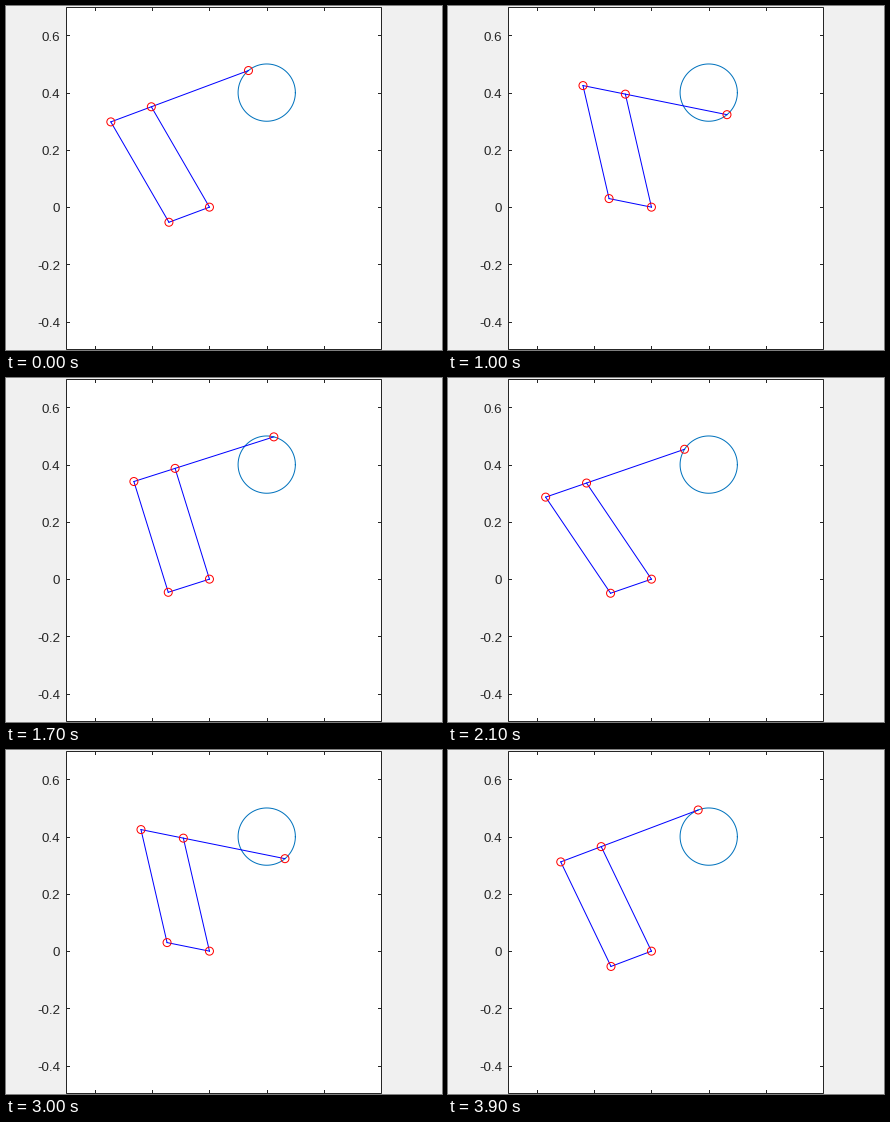
These frames come from a looping animation (436x344 px, 4000 ms). A matplotlib script:

```python
import numpy as np
import matplotlib.pyplot as plt
from matplotlib.animation import FuncAnimation
from matplotlib.patches import Circle, Rectangle

W, H, DPI = 436, 344, 100
PX = 72 / DPI                       # points per pixel
LEFT, RIGHT, TOP, BOTTOM = 60, 375, 1, 343
SCALE = (RIGHT - LEFT) / 1.1        # pixels per data unit
ORIGIN = np.array([203.45, 201.15])
INK = "#262626"
UPPER, FORE, BACK = 0.405, 0.362, 0.151     # link lengths
CENTRE, RADIUS = np.array([0.2, 0.4]), 0.1
FRAMES, STEPS_PER_TURN = 40, 20


def to_px(points):
    return ORIGIN + np.asarray(points) * [SCALE, -SCALE]


def on_circle(angle):
    angle = np.asarray(angle)
    return CENTRE + RADIUS * np.stack([np.cos(angle), np.sin(angle)], axis=-1)


def solve(tip):
    """Joint positions of the parallelogram arm that reaches the tip."""
    dist = np.hypot(*tip)
    bend = np.arccos((UPPER**2 + dist**2 - FORE**2) / (2 * UPPER * dist))
    angle = np.arctan2(tip[1], tip[0]) + bend
    knee = UPPER * np.array([np.cos(angle), np.sin(angle)])
    offset = (knee - tip) * BACK / FORE
    return np.zeros(2), knee, knee + offset, offset


fig = plt.figure(figsize=(W / DPI, H / DPI), dpi=DPI, facecolor="#f0f0f0")
ax = fig.add_axes([0, 0, 1, 1])
ax.set_xlim(0, W)
ax.set_ylim(H, 0)
ax.axis("off")


def stroke(x, y, color, **kw):
    return ax.plot(x, y, color=color, lw=PX, **kw)[0]


ax.add_patch(Rectangle((LEFT, TOP), RIGHT - LEFT, BOTTOM - TOP,
                       fc="white", ec=INK, lw=PX, zorder=0))

for value in (-0.4, -0.2, 0, 0.2, 0.4):
    x = to_px([value, 0])[0]
    stroke([x, x], [TOP, TOP + 3], INK)
    stroke([x, x], [BOTTOM - 3, BOTTOM], INK)

for value in (-0.4, -0.2, 0, 0.2, 0.4, 0.6):
    y = to_px([0, value])[1]
    stroke([LEFT, LEFT + 3], [y, y], INK)
    stroke([RIGHT - 3, RIGHT], [y, y], INK)
    ax.text(54, y + 5.3, f"{value:g}", ha="right", va="baseline", color=INK,
            family="Liberation Sans", size=13.33 * PX)

stroke(*to_px(on_circle(np.linspace(0, 2 * np.pi, 101))).T, "#0072bd")

links = [stroke([], [], "#0000ff") for _ in range(4)]
joints = [ax.add_patch(Circle((0, 0), 4, fill=False, ec="#ff0000", lw=PX, zorder=3))
          for _ in range(5)]


def draw(i):
    angle = np.radians(129.6 + 360 * (i % STEPS_PER_TURN) / STEPS_PER_TURN)
    tip = on_circle(angle)
    base, knee, back, foot = solve(tip)
    pairs = ((base, knee), (back, tip), (foot, back), (base, foot))
    for link, pair in zip(links, pairs):
        link.set_data(*to_px(pair).T)
    for joint, point in zip(joints, (base, knee, back, foot, tip)):
        joint.center = to_px(point)
    return links + joints


anim = FuncAnimation(fig, draw, frames=FRAMES, interval=100,
                     repeat=True, repeat_delay=0, blit=False)
plt.show()
```
